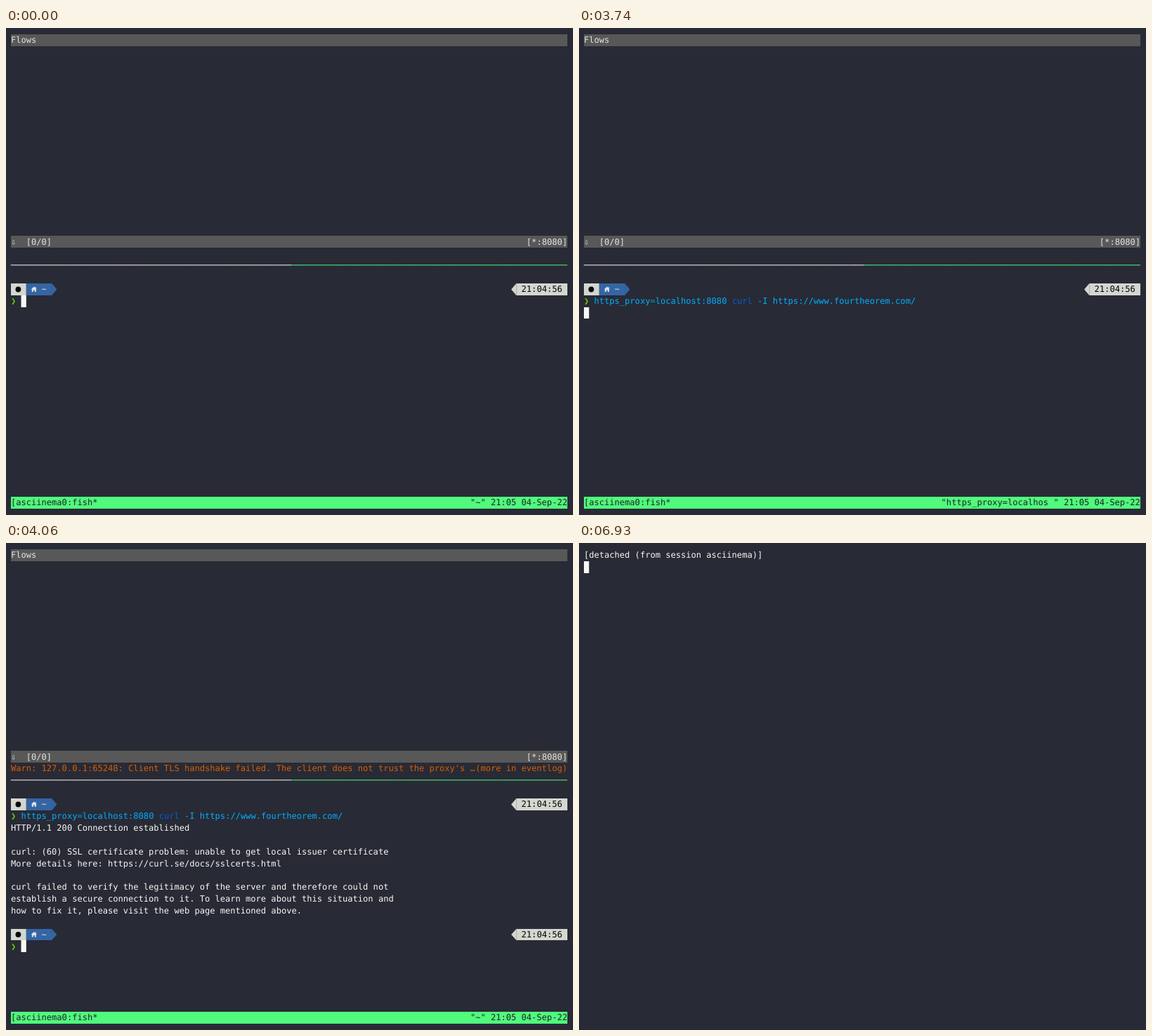
Write an HTML page that moves like this. It is 807 px wide and 694 px high and loops after 6.97 s.

```html
<!DOCTYPE html>
<html lang="en">
<head>
<meta charset="utf-8">
<title>Terminal session</title>
<style>
  html, body { margin: 0; width: 100%; height: 100%; overflow: hidden; background: #282a36; }
  svg { display: block; width: 807px; height: 694px; }
  text {
    font: 12.07px "DejaVu Sans Mono", "DejaVu Sans", monospace;
    white-space: pre;
    text-rendering: geometricPrecision;
  }
</style>
</head>
<body>
<svg id="term" viewBox="0 0 807 694"></svg>
<script>
const LOOP = 6970, COLS = 109;
const C = {
  fg: '#f8f8f2', bar: '#585858', barText: '#e4e4e4', green: '#50fa7b', black: '#21222c',
  light: '#d3d7cf', blue: '#3465a4', ok: '#5fd700', bad: '#ff0000', fail: '#cc0000',
  param: '#00afff', cmd: '#005fd7', op: '#00a6b2', warn: '#d75f00'
};

// Character grid
const X = col => +(7 + col * 7.266).toFixed(2);
const Y = row => Math.round(8.8 + row * 16.9);

const text = (col, row, str, fill = C.fg) =>
  `<text x="${X(col)}" y="${(21.2 + row * 16.9).toFixed(2)}" fill="${fill}">${str}</text>`;
const block = (col, row, cols, fill) =>
  `<rect x="${X(col)}" y="${Y(row)}" width="${X(col + cols) - X(col)}" height="${Y(row + 1) - Y(row)}" fill="${fill}"/>`;
const cursor = (col, row) => block(col, row, 1, C.fg);
const arrow = (from, to, row, fill) =>
  `<path d="M${X(from)} ${Y(row)}L${X(to)} ${(Y(row) + Y(row + 1)) / 2}L${X(from)} ${Y(row + 1)}Z" fill="${fill}"/>`;
const lines = (row, list) => list.map((s, i) => text(0, row + i, s)).join('');

function prompt(row, time, code) {
  const mid = (Y(row) + Y(row + 1)) / 2;
  const status = code
    ? arrow(93, 92, row, C.fail) + block(93, row, 6, C.fail) + text(94, row, '✘ ' + code, '#ffff00')
    : arrow(99, 98, row, C.light);
  return block(0, row, 3, C.light) + `<circle cx="17.4" cy="${mid}" r="3.9" fill="#080808"/>` +
    block(3, row, 5, C.blue) + arrow(8, 9, row, C.blue) +
    `<path transform="translate(39.8 ${mid})" d="M-4 0L0-4L2-2V-3.5H3V-1L4 0H3V3.5H1V1H-1V3.5H-3V0Z" fill="#e4e4e4"/>` +
    text(6, row, '~', '#e4e4e4') + status +
    block(99, row, 10, C.light) + text(100, row, time, '#000') +
    text(0, row + 1, '❯', code ? C.bad : C.ok);
}

const command = text(2, 22, 'https_proxy', C.param) + text(13, 22, '=', C.op) +
  text(14, 22, 'localhost:8080', C.param) + text(29, 22, 'curl', C.cmd) +
  text(34, 22, '-I https://www.fourtheorem.com/', C.param);

const reply = text(0, 23, 'HTTP/1.1 200 Connection established');

const warning = text(0, 18, "Warn: 127.0.0.1:65248: Client TLS handshake failed. The client does not trust the proxy's …", C.warn) +
  text(91, 18, '(more in eventlog)', C.warn);

const failure = warning + reply + lines(25, [
  'curl: (60) SSL certificate problem: unable to get local issuer certificate',
  'More details here: https://curl.se/docs/sslcerts.html',
  '',
  'curl failed to verify the legitimacy of the server and therefore could not',
  'establish a secure connection to it. To learn more about this situation and',
  'how to fix it, please visit the web page mentioned above.'
]);

function session(title, body) {
  const right = `"${title}" 21:05 04-Sep-22`;
  return block(0, 0, COLS, C.bar) + text(0, 0, 'Flows', C.barText) +
    block(0, 17, COLS, C.bar) + text(0, 17, '⇩', C.barText) +
    text(3, 17, '[0/0]', C.barText) + text(101, 17, '[*:8080]', C.barText) +
    text(0, 19, '─'.repeat(55)) + text(55, 19, '─'.repeat(54), C.green) +
    prompt(21, '21:04:56') +
    block(0, 39, COLS, C.green) + text(0, 39, '[asciinema0:fish*', C.black) +
    text(COLS - right.length, 39, right, C.black) + body;
}

const busy = 'https_proxy=localhos ';
const steps = [
  [0, session('~', cursor(2, 22))],
  [2020, session('~', command + cursor(65, 22))],
  [3740, session(busy, command + cursor(0, 23))],
  [3860, session(busy, command + reply + cursor(0, 25))],
  [4000, session(busy, command + failure + cursor(0, 31))],
  [4060, session('~', command + failure + prompt(32, '21:04:56') + cursor(2, 33))],
  [4420, session('~', command + failure + prompt(32, '21:05:38', 60) + cursor(2, 33))],
  [6930, text(0, 0, '[detached (from session asciinema)]') + cursor(0, 1)]
];

const term = document.getElementById('term');
term.innerHTML = steps.map(([, body]) => `<g visibility="hidden">${body}</g>`).join('');
const screens = [...term.children];
const start = performance.now();
let shown = -1;

function draw(now) {
  const t = Math.max(0, now - start) % LOOP;
  const next = steps.filter(([at]) => at <= t).length - 1;
  if (next !== shown) {
    screens.forEach((g, i) => g.setAttribute('visibility', i === next ? 'visible' : 'hidden'));
    shown = next;
  }
  requestAnimationFrame(draw);
}
draw(start);
</script>
</body>
</html>
```
